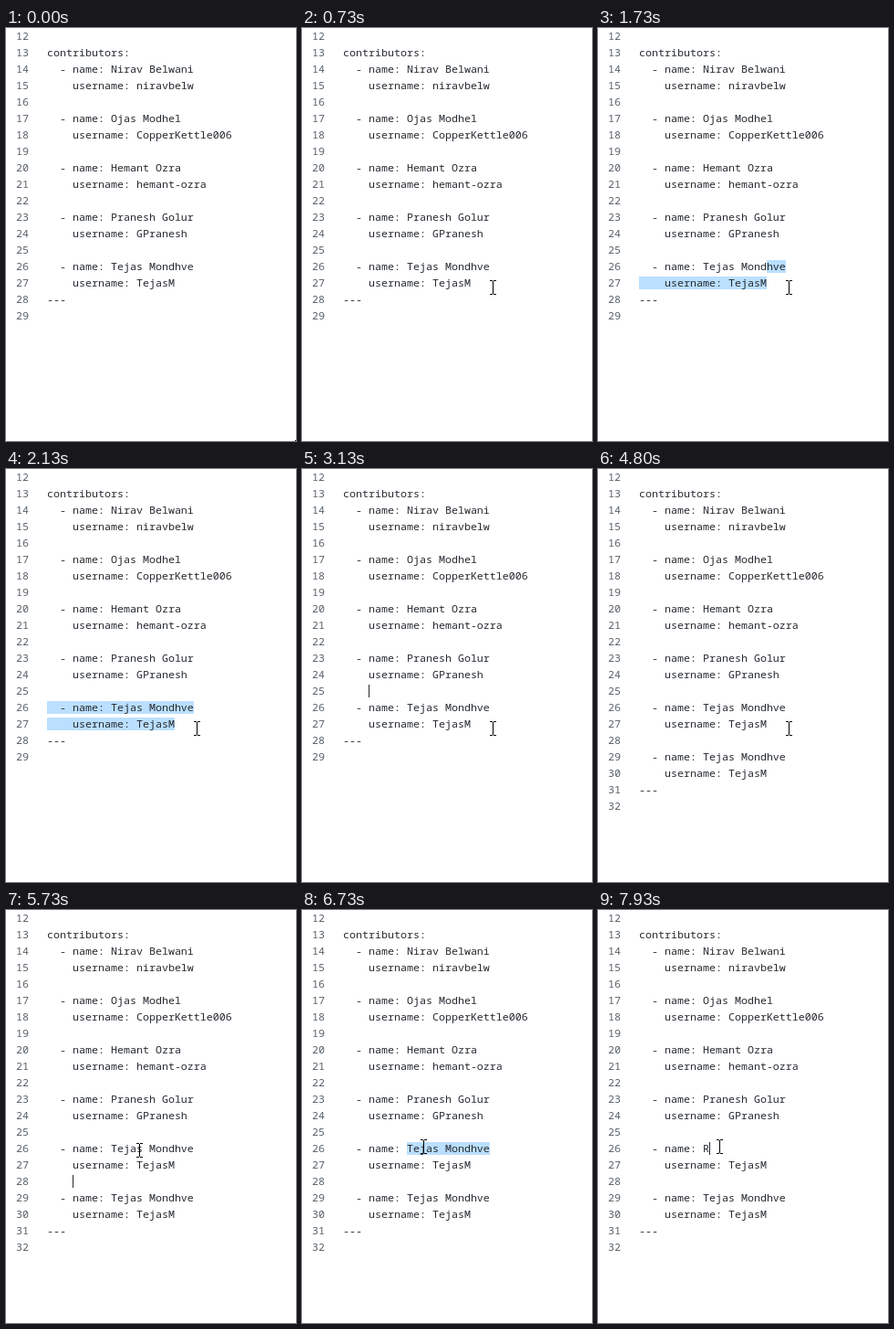
Write an HTML page that moves like this. It is 318x452 px and loops after 8000 ms.

```html
<!DOCTYPE html>
<html lang="en">
<head>
<meta charset="utf-8">
<title>Editing a contributors list</title>
<style>
  html, body { margin: 0; width: 100%; height: 100%; overflow: hidden; background: #fff; }
  svg { display: block; }
  text { font: 11.667px "Noto Sans Mono", "DejaVu Sans Mono", monospace; white-space: pre; fill: #24292f; }
  .number { fill: #57606a; }
  .selection { fill: #bbdfff; }
  .caret { fill: #24292f; shape-rendering: crispEdges; }
  #pointer { fill: #000; shape-rendering: crispEdges; }
</style>
</head>
<body>
<svg width="318" height="452" viewBox="0 0 318 452">
  <g id="selection"></g>
  <g id="lines"></g>
  <g id="caret"></g>
  <path id="pointer" d="M0 0h3v1h-3zM4 0h3v1h-3zM3 1h1v14h-1zM0 15h3v1h-3zM4 15h3v1h-3z"/>
</svg>
<script>
const LOOP = 8000, FRAME = 66.25, BLINK = 532, BLINK_START = 1065;
const FIRST_LINE = 12, LEFT = 45, CHAR = 7, ROW = 18;
const $ = id => document.getElementById(id);

const people = [
  ["Nirav Belwani", "niravbelw"],
  ["Ojas Modhel", "CopperKettle006"],
  ["Hemant Ozra", "hemant-ozra"],
  ["Pranesh Golur", "GPranesh"],
  ["Tejas Mondhve", "TejasM"]
];
const entry = ([name, username]) => [`  - name: ${name}`, `    username: ${username}`];
const INDENT = "    ";
const INITIAL = ["", "contributors:", ...people.flatMap(p => [...entry(p), INDENT]).slice(0, -1), "---", ""];

// A small text editor: a selection runs from anchor to head.
class Editor {
  lines = [...INITIAL];
  head = null;
  anchor = null;
  text(line) { return this.lines[line - FIRST_LINE]; }
  place(line, column = this.text(line).length) {
    this.anchor = { line, column };
    this.head = { line, column };
  }
  extendUp() { this.head.line--; }
  extendHome() { this.head.column = 0; }
  extendEnd() { this.head.column = this.text(this.head.line).length; }
  insertBelow(...added) {
    const { line } = this.head;
    this.lines.splice(line + 1 - FIRST_LINE, 0, ...added);
    this.place(line + added.length);
  }
  selectWord() {
    const { line, column } = this.head, text = this.text(line);
    this.anchor.column = text.lastIndexOf(" ", column) + 1;
    this.head.column = text.indexOf(" ", column);
  }
  type(added) {
    const { line, column } = this.anchor, text = this.text(line);
    this.lines[line - FIRST_LINE] = text.slice(0, column) + added + text.slice(this.head.column);
    this.place(line, column + added.length);
  }
  selectedRanges() {
    if (!this.head) return [];
    const [start, end] = [this.anchor, this.head].sort((a, b) => a.line - b.line || a.column - b.column);
    const ranges = [];
    for (let line = start.line; line <= end.line; line++) {
      const from = line === start.line ? start.column : 0;
      const to = line === end.line ? end.column : this.text(line).length;
      if (to > from) ranges.push({ line, from, to });
    }
    return ranges;
  }
}

const actions = [
  [1070, e => e.place(27)],
  [1730, e => e.extendUp()],
  [2130, e => e.extendHome()],
  [3130, e => e.place(25)],
  [4130, e => e.insertBelow(...entry(people.at(-1)))],
  [4600, e => e.insertBelow(INDENT)],
  [6200, e => e.place(26, 13)],
  [6330, e => e.selectWord()],
  [6730, e => e.extendEnd()],
  [7930, e => e.type("R")]
];

// The caret shows at once after an action, then toggles on a steady clock.
const blinks = t => Math.floor((t - BLINK_START) / BLINK);

// Progress of a pointer move in nine visible steps.
const stepped = (t, start) => Math.max(0, Math.min(9, Math.floor((t - start) / FRAME) + 1)) / 9;

function pointerAt(t) {
  const enter = stepped(t, 200), move = stepped(t, 5330);
  const away = (1 - enter) ** 2;
  const eased = (move + move * move * (3 - 2 * move)) / 2;
  return [206 + 111 * away - 76 * eased, 276 + 175 * away - 25 * eased].map(Math.round);
}

function box(kind, line, column, width) {
  const x = LEFT + CHAR * column, y = 2 + ROW * (line - FIRST_LINE);
  return `<rect class="${kind}" x="${x}" y="${y}" width="${width}" height="14"/>`;
}

function lineMarkup(line, i) {
  const y = 13 + ROW * i;
  return `<text class="number" x="11" y="${y}">${FIRST_LINE + i}</text><text x="${LEFT}" y="${y}">${line}</text>`;
}

function put(id, markup) {
  const node = $(id);
  if (node.markup !== markup) node.innerHTML = node.markup = markup;
}

function draw(t) {
  const editor = new Editor();
  let lastAction = 0;
  for (const [start, act] of actions) {
    if (start > t) break;
    act(editor);
    lastAction = start;
  }
  const ranges = editor.selectedRanges(), { head } = editor;
  const caretOn = head && !ranges.length && (blinks(t) - blinks(lastAction)) % 2 === 0;
  put("lines", editor.lines.map(lineMarkup).join(""));
  put("selection", ranges.map(r => box("selection", r.line, r.from, CHAR * (r.to - r.from))).join(""));
  put("caret", caretOn ? box("caret", head.line, head.column, 1) : "");
  $("pointer").setAttribute("transform", `translate(${pointerAt(t)})`);
}

const begin = performance.now();
function tick() {
  draw((performance.now() - begin) % LOOP);
  requestAnimationFrame(tick);
}
tick();
</script>
</body>
</html>
```
